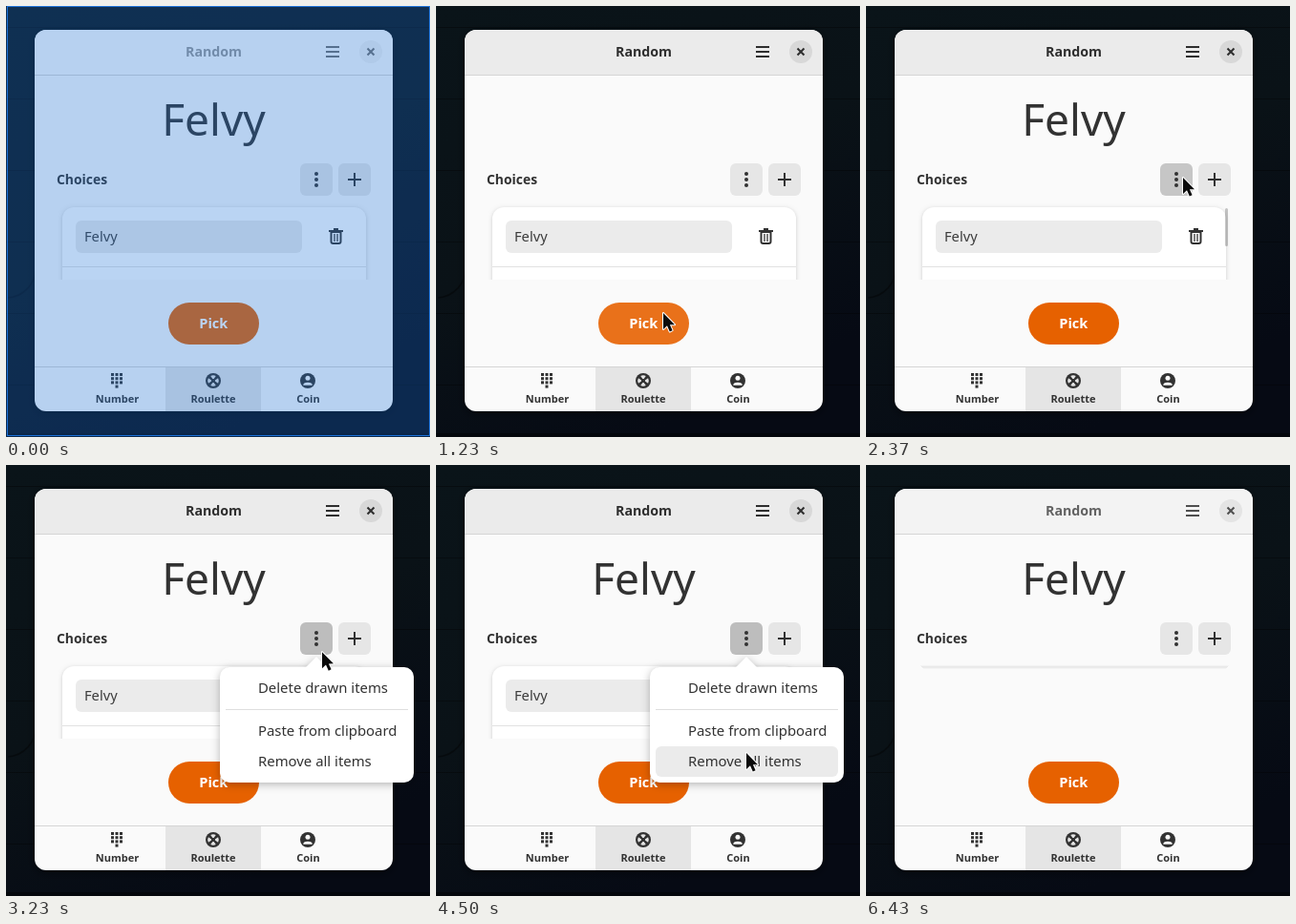
Animation, 444 px wide and 452 px high, one loop 6.57 s. Source, as an HTML page with a canvas:

```html
<!DOCTYPE html>
<html lang="en">
<head>
<meta charset="utf-8">
<title>Random picker</title>
<style>
  html, body { margin: 0; width: 100%; height: 100%; overflow: hidden; background: #0a1116; }
  canvas { display: block; width: 444px; height: 452px; }
</style>
</head>
<body>
<canvas id="stage"></canvas>
<script>
const W = 444, H = 452, LOOP = 6570, STEP = 200 / 3;
const INK = '#323232', PAPER = '#fafafa', LINE = '#d5d5d5';
const NAME = 'Felvy';

const canvas = document.getElementById('stage');
const ctx = canvas.getContext('2d');
const dpr = window.devicePixelRatio || 1;
canvas.width = W * dpr;
canvas.height = H * dpr;

// Pointer path: time, x, y
const PATH = [
  [433, 450, 458], [500, 424, 434], [567, 362, 388], [633, 293, 343], [700, 253, 321],
  [767, 242, 321], [833, 238, 322], [1567, 238, 322], [1700, 252, 300],
  [1900, 296, 232], [2100, 326, 187], [2233, 332, 180], [3167, 332, 180],
  [3233, 331, 196], [3367, 328, 250], [3433, 326, 270], [3500, 326, 272],
  [3567, 325, 292], [3633, 325, 300], [3700, 325, 302], [5433, 325, 302],
  [5567, 470, 312]
];

const ITEMS = [
  { label: 'Delete drawn items', y: 218 },
  { label: 'Paste from clipboard', y: 263 },
  { label: 'Remove all items', y: 295 }
];

const lerp = (a, b, k) => a + (b - a) * k;
const ramp = (t, a, b) => Math.min(1, Math.max(0, (t - a) / (b - a)));
const pulse = (t, a, b, c, d) => ramp(t, a, b) - ramp(t, c, d);
const mix = (a, b, k) => `rgb(${a.map((v, i) => Math.round(lerp(v, b[i], k)))})`;
const grey = v => `rgb(${Math.round(v)},${Math.round(v)},${Math.round(v)})`;

function rect(x, y, w, h, color) {
  ctx.fillStyle = color;
  ctx.fillRect(x, y, w, h);
}

function round(x, y, w, h, r, color) {
  ctx.fillStyle = color;
  ctx.beginPath();
  ctx.roundRect(x, y, w, h, r);
  ctx.fill();
}

function disc(x, y, r, color) {
  ctx.fillStyle = color;
  ctx.beginPath();
  ctx.arc(x, y, r, 0, 7);
  ctx.fill();
}

function text(s, x, y, size, color, weight = 400, align = 'left') {
  ctx.font = `${weight} ${size}px "Noto Sans", "Open Sans", sans-serif`;
  ctx.textAlign = align;
  ctx.fillStyle = color;
  ctx.fillText(s, x, y);
}

function stroke(color, width, ...lines) {
  ctx.strokeStyle = color;
  ctx.lineWidth = width;
  ctx.beginPath();
  for (const [x1, y1, x2, y2] of lines) {
    ctx.moveTo(x1, y1);
    ctx.lineTo(x2, y2);
  }
  ctx.stroke();
}

function shadow(color, blur, dy, draw) {
  ctx.save();
  ctx.shadowColor = color;
  ctx.shadowBlur = blur * dpr;
  ctx.shadowOffsetY = dy * dpr;
  draw();
  ctx.restore();
}

function pointer(t) {
  const i = PATH.findIndex(p => p[0] > t);
  if (i < 1) return null;
  const a = PATH[i - 1], b = PATH[i], k = ramp(t, a[0], b[0]);
  return [lerp(a[1], b[1], k), lerp(a[2], b[2], k)];
}

function drawWall() {
  const g = ctx.createLinearGradient(0, 0, 220, H);
  g.addColorStop(0, '#0a1419');
  g.addColorStop(0.55, '#0a1217');
  g.addColorStop(1, '#060a14');
  rect(0, 0, W, H, g);
  for (let y = 22; y < H; y += 75) rect(0, y, W, 1, 'rgba(0,0,0,.35)');
  rect(0, 448, W, 4, 'rgba(0,0,0,.45)');
  ctx.strokeStyle = 'rgba(0,0,0,.4)';
  ctx.lineWidth = 1.5;
  ctx.beginPath();
  ctx.arc(0, 275, 31, 0, 1.5);
  ctx.stroke();
}

function drawHeader(focus) {
  rect(30, 25, 375, 47, grey(lerp(250, 235, focus)));
  rect(30, 72, 375, 1, LINE);
  const ink = grey(lerp(150, 46, focus));
  const icon = grey(lerp(112, 46, focus));
  text('Random', 217.5, 53, 14.2, ink, 700, 'center');
  for (const y of [42, 47, 52]) rect(335, y, 14, 2, icon);
  disc(382, 48, 12, grey(lerp(240, 216, focus)));
  stroke(icon, 2, [378.5, 44.5, 385.5, 51.5], [385.5, 44.5, 378.5, 51.5]);
}

function drawTabs() {
  rect(167, 378, 100, 47, '#e5e5e5');
  rect(30, 378, 375, 1, LINE);
  for (let i = 0; i < 9; i++) {
    rect(110 + i % 3 * 4.5, 385 + Math.floor(i / 3) * 4.2, 3, 3, INK);
  }
  rect(114.5, 397.6, 3, 3, INK);

  disc(217, 393, 8, INK);
  for (let i = 0; i < 4; i++) {
    const a = i * Math.PI / 2;
    ctx.fillStyle = '#e5e5e5';
    ctx.beginPath();
    ctx.arc(217, 393, 5.8, a - 0.5, a + 0.5);
    ctx.arc(217, 393, 2, a + 0.3, a - 0.3, true);
    ctx.fill();
  }

  disc(316, 393, 8, INK);
  disc(316, 390.3, 2.5, PAPER);
  ctx.beginPath();
  ctx.ellipse(316, 397.8, 4.8, 3, 0, Math.PI, 0);
  ctx.fill();

  text('Number', 116.5, 416, 11, INK, 700, 'center');
  text('Roulette', 217, 416, 11, INK, 700, 'center');
  text('Coin', 316.5, 416, 11, INK, 700, 'center');
}

function drawTrash(x, y) {
  rect(x, y + 2, 15, 2, INK);
  rect(x + 5, y, 5, 2, INK);
  ctx.strokeStyle = INK;
  ctx.lineWidth = 2;
  ctx.beginPath();
  ctx.roundRect(x + 2.5, y + 4, 10, 12, [0, 0, 2, 2]);
  ctx.stroke();
  stroke(INK, 1.3, [x + 6, y + 6, x + 6, y + 14], [x + 9, y + 6, x + 9, y + 14]);
}

function drawList(bar) {
  ctx.save();
  ctx.beginPath();
  ctx.rect(50, 205, 340, 82);
  ctx.clip();
  shadow('rgba(0,0,0,.18)', 4, 1, () => round(59, 211, 318, 124, 12, '#fff'));
  rect(59, 273, 318, 1, '#e2e2e2');
  round(73, 225, 237, 34, 6, '#ebebeb');
  text(NAME, 82, 247, 14.7, '#3c3c3c');
  drawTrash(338, 233);
  if (bar > 0) round(376, 212, 3, 40, 1.5, `rgba(0,0,0,${0.22 * bar})`);
  ctx.restore();
}

function drawEmptyList() {
  for (let i = 0; i < 4; i++) rect(57 + i, 210 + i, 323 - 2 * i, 1, grey([243, 233, 235, 244][i]));
}

function drawButtons(t) {
  let v = lerp(230, 218, ramp(t, 2100, 2230));
  v = lerp(v, 198, ramp(t, 2230, 2360));
  v = lerp(v, 189, ramp(t, 2430, 2630));
  v = lerp(v, 230, ramp(t, 4767, 4967));
  round(308, 165, 34, 34, 6, grey(v));
  round(348, 165, 34, 34, 6, '#e6e6e6');
  for (const y of [176, 182, 188]) disc(325, y, 2, INK);
  rect(358, 181, 14, 2, INK);
  rect(364, 175, 2, 14, INK);

  const hover = pulse(t, 710, 900, 1690, 1890);
  const press = pulse(t, 930, 1000, 1030, 1190);
  const [r, g, b] = [230, 97, 0].map(c => lerp(c, 255, hover * 0.1));
  round(170, 311, 95, 44, 22, mix([r, g, b], [184, 78, 0], press));
  text('Pick', 217.3, 338, 14.6, '#fff', 700, 'center');
}

function drawMenu(t, pos) {
  shadow('rgba(0,0,0,.28)', 9, 2, () => {
    ctx.fillStyle = '#fff';
    ctx.beginPath();
    ctx.roundRect(224, 212, 203, 121, 10);
    ctx.moveTo(314, 212);
    ctx.lineTo(325, 201);
    ctx.lineTo(336, 212);
    ctx.fill();
  });
  rect(230, 256, 191, 1, '#dedede');
  for (const { label, y } of ITEMS) {
    const over = pos && pos[1] >= y && pos[1] < y + 32;
    if (over) round(230, y, 191, 32, 6, t > 4690 ? '#dcdcdc' : '#ebebeb');
    text(label, 264, y + 21, 14.9, INK);
  }
}

function drawPointer([x, y]) {
  const shape = [[0, 0], [0, 17], [4, 13.3], [6.8, 19.5], [9.6, 18.2], [6.9, 12.3], [12, 12.2]];
  ctx.beginPath();
  for (const [dx, dy] of shape) ctx.lineTo(x + dx, y + dy);
  ctx.closePath();
  ctx.lineJoin = 'round';
  ctx.strokeStyle = '#fff';
  ctx.lineWidth = 2;
  ctx.stroke();
  ctx.fillStyle = '#0b0b0b';
  ctx.fill();
}

function drawSelection(alpha) {
  ctx.globalAlpha = alpha;
  rect(0, 0, W, H, 'rgba(28,113,216,.3)');
  ctx.strokeStyle = '#1c71d8';
  ctx.lineWidth = 1;
  ctx.strokeRect(1.5, 0.5, 442, 450);
  ctx.globalAlpha = 1;
}

function draw(t) {
  const pos = pointer(t);
  const focus = t > 6400 ? 0.5 : ramp(t, 940, 1150);
  ctx.setTransform(dpr, 0, 0, dpr, 0, 0);
  drawWall();

  shadow('rgba(0,0,0,.5)', 10, 2, () => round(30, 25, 375, 400, 12, PAPER));
  ctx.save();
  ctx.beginPath();
  ctx.roundRect(30, 25, 375, 400, 12);
  ctx.clip();
  drawHeader(focus);
  ctx.globalAlpha = 1 - pulse(t, 1000, 1200, 1300, 1550);
  text(NAME, 217.5, 136, 46, INK, 400, 'center');
  ctx.globalAlpha = 1;
  text('Choices', 53, 187, 13.9, INK, 700);
  if (t < 4950) drawList(pulse(t, 1800, 2000, 3200, 3400));
  else drawEmptyList();
  drawButtons(t);
  drawTabs();
  ctx.restore();

  if (t > 2420 && t < 4760) drawMenu(t, pos);
  if (pos) drawPointer(pos);
  const veil = 1 - ramp(t, 40, 300);
  if (veil > 0) drawSelection(t < 95 ? 1 : veil);
}

const start = performance.now();

function tick() {
  const t = (performance.now() - start) % LOOP;
  draw(t < 95 ? 0 : 100 + Math.floor((t - 95) / STEP) * STEP);
  requestAnimationFrame(tick);
}
tick();
</script>
</body>
</html>
```
